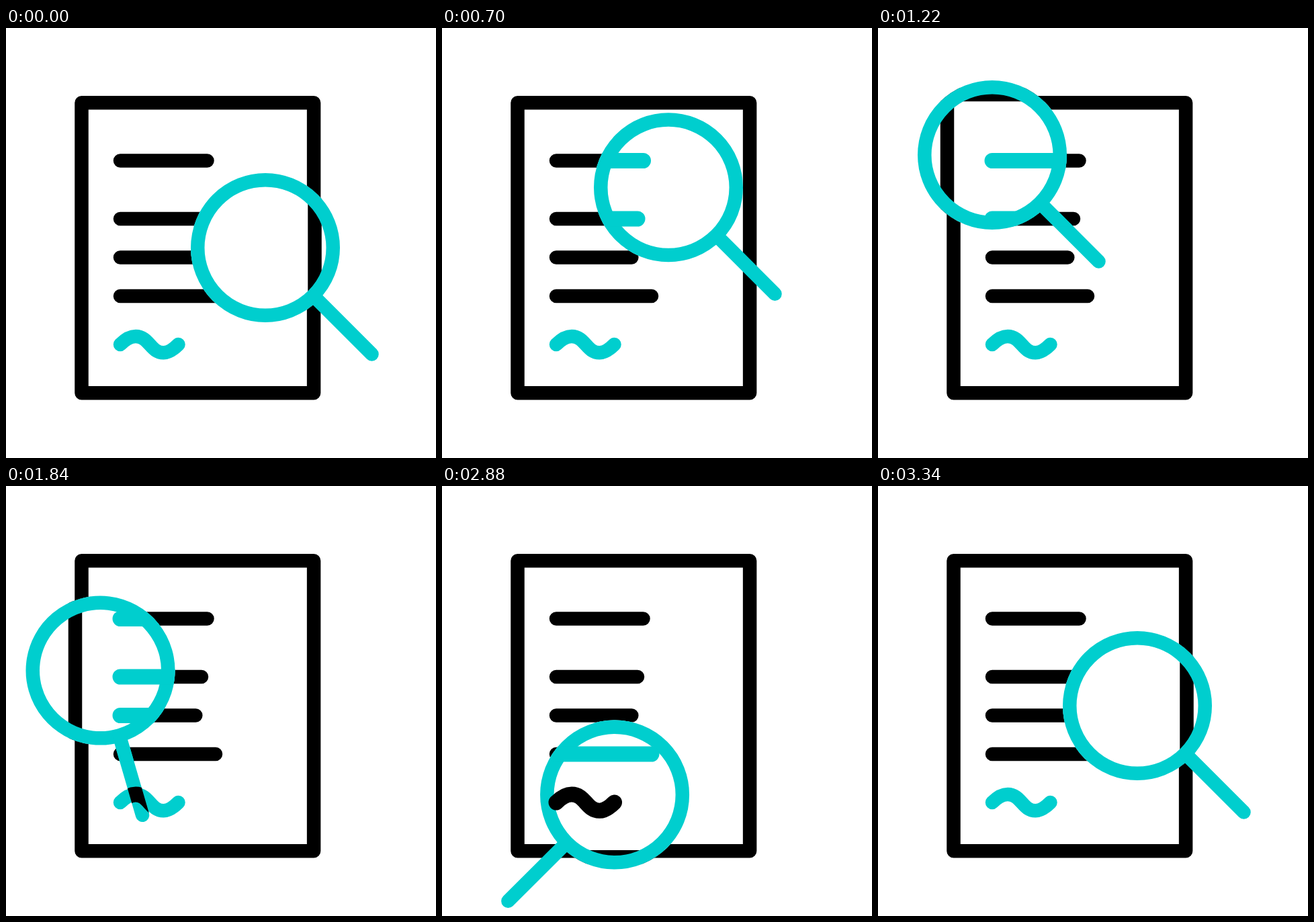
Write an HTML page that moves like this. It is 640x640 px and loops after 3.62 s.

```html
<!DOCTYPE html>
<html lang="en">
<head>
<meta charset="utf-8">
<title>Document search</title>
<style>
  html, body { margin: 0; width: 100%; height: 100%; overflow: hidden; background: #fff; }
  svg { display: block; width: 100vw; height: 100vh; }
  .line { fill: none; stroke-width: 20.5; stroke-linecap: round; stroke-linejoin: round; }
  .bold { stroke-width: 23; }
  .black { stroke: #000; }
  .cyan { stroke: #00cece; }
</style>
</head>
<body>
<svg viewBox="0 0 640 640">
  <defs>
    <path id="bars" d="M170 197.5H299.5M170 284H291M170 341.5H282.3M170 399H312"/>
    <path id="sign" d="M170 471C178 463 186 459 193 459C213 459 215 483.3 234.5 483.3C242 483.3 249 478.500 256.500 471"/>
    <clipPath id="disc" class="follow"><circle r="111"/></clipPath>
    <clipPath id="glass" class="follow">
      <circle r="111"/>
      <rect x="100" y="-10.25" width="134.3" height="20.5" rx="10.25" transform="rotate(45)"/>
    </clipPath>
  </defs>

  <g class="line black">
    <rect x="112.500" y="111.2" width="345.6" height="432"/>
    <use href="#bars"/>
  </g>
  <use href="#sign" class="line cyan"/>

  <!-- enlarged sheet seen through the lens -->
  <g clip-path="url(#disc)">
    <rect width="640" height="640" fill="#fff"/>
    <rect class="line black" x="103" y="99" width="356.5" height="453.3"/>
  </g>

  <g class="line cyan follow">
    <circle r="100.75"/>
    <path d="M72 72L158.5 158.5"/>
  </g>

  <!-- marks swap colour wherever the magnifier covers them -->
  <g clip-path="url(#glass)">
    <use href="#bars" class="line bold cyan"/>
    <use href="#sign" class="line bold black"/>
  </g>
</svg>
<script>
  const LOOP = 3620, STEP = 20, TURN = 92.4;
  const followers = document.querySelectorAll('.follow');

  // CSS-style easing with control heights 0 and 1
  function ease(x1, x2) {
    return x => {
      let lo = 0, hi = 1;
      for (let i = 0; i < 24; i++) {
        const m = (lo + hi) / 2, n = 1 - m;
        if (3 * m * n * n * x1 + 3 * m * m * n * x2 + m * m * m < x) lo = m; else hi = m;
      }
      return lo * lo * (3 - 2 * lo);
    };
  }
  const soft = ease(1 / 3, 2 / 3);

  function move(start, end, curve, d) {
    const path = document.createElementNS('http://www.w3.org/2000/svg', 'path');
    path.setAttribute('d', d);
    return { start, end, curve, path, length: path.getTotalLength() };
  }
  const moves = [
    move(200, 1220, ease(.44, .8), 'M386 327C390 264 254 137 170 189'),
    move(1500, 2415, soft, 'M170 189C106.5 258 157 378 213 464'),
    move(2710, 3340, soft, 'M213 464C253 474 416 409 386 327')
  ];
  const turns = [
    { start: 1500, end: 2415, curve: soft, by: TURN },
    { start: 2830, end: 3340, curve: ease(1 / 3, .8), by: -TURN }
  ];

  const progress = (t, s) =>
    s.curve(Math.min(1, Math.max(0, (t - s.start) / (s.end - s.start))));

  function draw(t) {
    const m = moves.filter(s => t >= s.start).pop() || moves[0];
    const p = m.path.getPointAtLength(m.length * progress(t, m));
    const angle = turns.reduce((sum, s) => sum + s.by * progress(t, s), 0);
    const pose = `translate(${p.x.toFixed(2)} ${p.y.toFixed(2)}) rotate(${angle.toFixed(2)})`;
    followers.forEach(el => el.setAttribute('transform', pose));
  }

  const begin = performance.now();
  function tick() {
    const t = (performance.now() - begin) % LOOP;
    draw(Math.floor(t / STEP) * STEP);
    requestAnimationFrame(tick);
  }
  tick();
</script>
</body>
</html>
```
